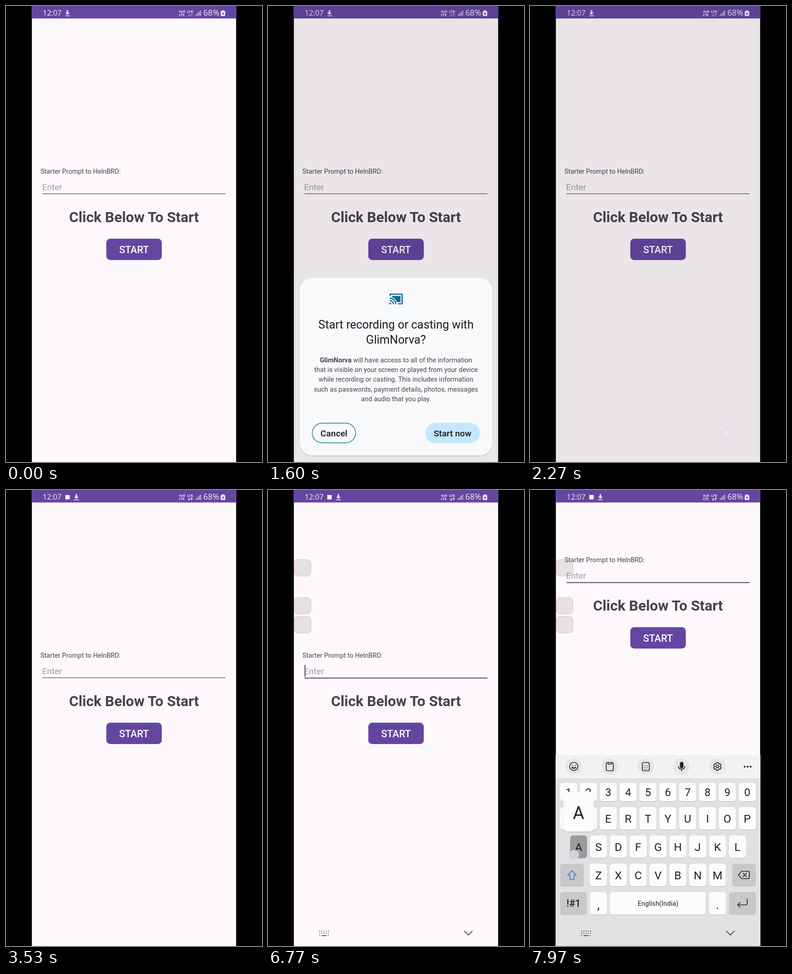
Animation, 561 px wide and 998 px high, one loop 8000 ms. Source, as an HTML page:

```html
<!DOCTYPE html>
<html lang="en">
<head>
<meta charset="utf-8">
<title>Start screen</title>
<style>
  html, body { margin: 0; width: 100%; height: 100%; overflow: hidden; background: #000; }
  svg { display: block; width: 100%; height: 100%; font-family: Roboto, sans-serif; }
  .mid { text-anchor: middle; }
  .medium { font-weight: 500; }
  .status { font-family: "Open Sans", sans-serif; }
  .line { fill: none; stroke-linecap: round; stroke-linejoin: round; }

  .anim { animation: 8s linear infinite; }
  #dim { animation-name: dim; }
  #sheet { animation-name: sheet; }
  #form { animation-name: form; }
  #ripple { animation-name: ripple; }
  #thin { animation-name: thin; }
  #thick { animation-name: thick; }
  #caret { animation-name: caret; }
  #notice { animation-name: notice; }
  #download { animation-name: download; }
  #traffic { animation-name: traffic; }
  #bubbles { animation-name: bubbles; }
  #nav { animation-name: nav; }
  #keyboard { animation-name: keyboard; }
  .lower { animation-name: lower; }
  .upper { animation-name: upper; }
  #shift { animation-name: shift; }
  #shiftPress { animation-name: shiftPress; }
  #pressA { animation-name: pressA; }
  #dot { animation-name: dot; }
  #spot { animation-name: spot; animation-timing-function: step-end; }

  @keyframes dim { 0%, 17.5% { opacity: 0 } 19.6%, 28.8% { opacity: 1 } 32%, 100% { opacity: 0 } }
  @keyframes sheet {
    0%, 17.5% { transform: translateY(420px); animation-timing-function: cubic-bezier(.1, .7, .3, 1) }
    19.8%, 26.6% { transform: none; animation-timing-function: ease-in }
    28.1%, 100% { transform: translateY(420px) }
  }
  @keyframes form { 0%, 86.9% { transform: none } 86.91%, 100% { transform: translateY(-209px) } }
  @keyframes ripple {
    0%, 7.1% { opacity: 0 } 8%, 9% { opacity: .2 } 13%, 65.2% { opacity: 0 }
    66%, 67% { opacity: .2 } 71%, 100% { opacity: 0 }
  }
  @keyframes thin { 0%, 81.4% { opacity: 1 } 81.5%, 100% { opacity: 0 } }
  @keyframes thick { 0%, 81.4% { opacity: 0 } 81.5%, 100% { opacity: 1 } }
  @keyframes caret { 0%, 82% { opacity: 0 } 82.01%, 95% { opacity: 1 } 95.01%, 100% { opacity: 0 } }
  @keyframes notice { 0%, 38.7% { opacity: 0 } 39.5%, 100% { opacity: 1 } }
  @keyframes download { 0%, 38.4% { transform: translateX(-19.5px) } 40.5%, 100% { transform: none } }
  @keyframes traffic { 0%, 43.4% { opacity: .5 } 43.5%, 100% { opacity: 1 } }
  @keyframes bubbles { 0%, 68.8% { opacity: 0 } 71.5%, 100% { opacity: 1 } }
  @keyframes nav { 0%, 82.5% { opacity: 0 } 84.4%, 100% { opacity: 1 } }
  @keyframes keyboard {
    0%, 86.6% { transform: translateY(418px); animation-timing-function: cubic-bezier(.2, .6, .3, 1) }
    89.6%, 100% { transform: none }
  }
  @keyframes lower { 0%, 95.2% { opacity: 1 } 95.21%, 100% { opacity: 0 } }
  @keyframes upper { 0%, 95.2% { opacity: 0 } 95.21%, 100% { opacity: 1 } }
  @keyframes shift { 0%, 95.2% { stroke: #222 } 95.21%, 100% { stroke: #3b6fd0 } }
  @keyframes shiftPress { 0%, 94.1% { opacity: 0 } 94.12%, 95.2% { opacity: .25 } 95.8%, 100% { opacity: 0 } }
  @keyframes pressA { 0%, 98.6% { opacity: 0 } 98.61%, 100% { opacity: 1 } }
  @keyframes dot {
    0%, 7.1% { opacity: 0 } 7.2%, 8.5% { opacity: 1 } 9.2%, 25.4% { opacity: 0 }
    25.5%, 27.6% { opacity: 1 } 28.4% { opacity: .65 } 28.9%, 65.1% { opacity: 0 }
    65.4%, 66.4% { opacity: 1 } 67.2%, 80.9% { opacity: 0 }
    81%, 82.1% { opacity: 1 } 83%, 94.1% { opacity: 0 }
    94.2%, 95.2% { opacity: 1 } 95.8%, 98.5% { opacity: 0 } 98.6%, 100% { opacity: 1 }
  }
  @keyframes spot {
    0% { transform: translate(290px, 536px) }
    20% { transform: translate(430px, 935px) }
    50% { transform: translate(290px, 536px) }
    75% { transform: translate(240px, 397px) }
    88% { transform: translate(92px, 846px) }
    97%, 100% { transform: translate(97px, 798px) }
  }
</style>
</head>
<body>
<svg viewBox="0 0 561 998">
  <defs>
    <clipPath id="phone"><rect x="56.7" width="447.6" height="998"/></clipPath>
    <filter id="soft" x="-20%" y="-20%" width="140%" height="140%">
      <feDropShadow dx="0" dy="1" stdDeviation="1" flood-opacity=".25"/>
    </filter>
  </defs>
  <rect width="561" height="998"/>
  <g clip-path="url(#phone)">
    <rect x="56" width="449" height="998" fill="#fdf8fc"/>

    <g id="form" class="anim" fill="#46434d">
      <text x="75.4" y="367" font-size="14.5">Starter Prompt to HelnBRD:</text>
      <text x="79" y="403" font-size="19" fill="#a19ca6">Enter</text>
      <rect id="thin" class="anim" x="80" y="410.2" width="401" height="1.3" fill="#55525c"/>
      <rect id="thick" class="anim" x="80" y="410.5" width="401" height="2.2" fill="#5d5773"/>
      <rect id="caret" class="anim" x="80" y="383" width="2.2" height="26" fill="#5d4c92"/>
      <text class="mid" x="280.5" y="473" font-size="31.6" font-weight="700">Click Below To Start</text>
      <rect x="219.8" y="509.3" width="121.6" height="46.8" rx="8.5" fill="#6446a0"/>
      <rect id="ripple" class="anim" x="219.8" y="509.3" width="121.6" height="46.8" rx="8.5" fill="#fff"/>
      <text class="mid medium" x="280.6" y="541" font-size="21.5" fill="#fff">START</text>
    </g>

    <g id="bubbles" class="anim" fill="#000" fill-opacity=".09" stroke="#f2bcbc" stroke-width="1.2">
      <rect x="57.5" y="152" width="36.5" height="36.5" rx="9"/>
      <rect x="57.5" y="235" width="36.5" height="36.5" rx="9"/>
      <rect x="57.5" y="276.5" width="36.5" height="36.5" rx="9"/>
    </g>

    <g fill="#f1ebfa">
      <rect x="56" width="449" height="27.3" fill="#6446a0"/>
      <text class="status" x="80.5" y="21.2" font-size="16.2">12:07</text>
      <rect id="notice" class="anim" x="130" y="11" width="9.5" height="9.5" fill="#fff"/>
      <path id="download" class="anim" d="M152.7 9h3v5.5h3.3l-4.8 5-4.8-5h3.3zM149 20.7h10.6v1.6H149z"/>
      <g font-weight="700" font-size="8">
        <text x="379" y="15" font-size="7.5">Vo</text>
        <text x="379" y="22" font-size="7.5">LTE</text>
        <text x="397" y="15">LTE</text>
      </g>
      <path class="line" stroke="#f1ebfa" d="M389 9.5q1.7 2.5 0 5M391 9q2 3 0 6"/>
      <path id="traffic" class="anim line" stroke="#f1ebfa" stroke-width="1.2"
        d="M401.5 17v5.5m-2-2 2 2 2-2M407 22.5v-5.5m-2 2 2-2 2 2"/>
      <path d="M416 18h1.7v3.5h-1.7zM419.2 15.5h1.7v6h-1.7zM422.4 12.5h1.7v9h-1.7zM425.6 10h1.7v11.5h-1.7z" opacity=".85"/>
      <text class="status" x="432.4" y="21.3" font-size="17.8">68%</text>
      <path d="M473.5 9.5h4v1.5h1q2 0 2 2v7q0 2-2 2h-6q-2 0-2-2v-7q0-2 2-2h1z"/>
      <path fill="#6446a0" d="M477 12.5l-4 5h2.3l-1 3.5 4.2-5h-2.3z"/>
    </g>

    <rect id="dim" class="anim" x="56" width="449" height="998" fill-opacity=".08"/>

    <g id="sheet" class="anim">
      <rect x="69" y="594.5" width="423" height="389.5" rx="29" fill="#f7f9fb" filter="url(#soft)"/>
      <g fill="none" stroke="#126c90" stroke-width="2.6">
        <path d="M267.5 634v-3.2h26.5v20.9h-9"/>
        <path d="M267 639.5a13 13 0 0 1 13 13.3M267 644.7a8 8 0 0 1 8 8.1"/>
      </g>
      <path fill="#126c90" d="M266.2 649a4 4 0 0 1 4 4h-4zM272 634.5h18.5v13.5h-8.2q-2.5-8-10.3-10.8z"/>
      <g class="mid" fill="#191c1f" font-size="25.4">
        <text x="280.5" y="706">Start recording or casting with</text>
        <text x="280.5" y="739">GlimNorva?</text>
      </g>
      <g class="mid" fill="#43464b" font-size="14.6">
        <text x="280.5" y="780"><tspan font-weight="700">GlimNorva</tspan> will have access to all of the information</text>
        <text x="280.5" y="801.2">that is visible on your screen or played from your device</text>
        <text x="280.5" y="822.4">while recording or casting. This includes information</text>
        <text x="280.5" y="843.6">such as passwords, payment details, photos, messages</text>
        <text x="280.5" y="864.8">and audio that you play.</text>
      </g>
      <rect x="97" y="913" width="95" height="43" rx="21.5" fill="none" stroke="#1b7391" stroke-width="1.4"/>
      <rect x="345" y="912.5" width="119.5" height="44" rx="22" fill="#c3e8fd"/>
      <g class="mid medium" fill="#15191c" font-size="19.2">
        <text x="144.5" y="942">Cancel</text>
        <text x="404.5" y="942">Start now</text>
      </g>
    </g>

    <g id="keyboard" class="anim">
      <rect x="56" y="580" width="449" height="418" fill="#e1e1e3"/>
      <rect x="56" y="580" width="449" height="51" fill="#f2f2f3"/>
      <g id="tools" fill="#e6e6e8"></g>
      <g class="line" stroke="#222" stroke-width="1.7">
        <circle cx="96" cy="605" r="9"/>
        <path d="M91.5 607q4.5 6 9 0zM92.8 602v.6M99.2 602v.6"/>
        <rect x="167" y="596.5" width="15.5" height="18" rx="3"/>
        <path d="M171 597v3h7.5v-3"/>
        <rect x="246" y="596.5" width="15.5" height="18" rx="3"/>
        <path stroke-dasharray=".1 3.5" d="M250 603h9M250 607h9M252 611h5"/>
        <path d="M325.5 605q0 6 6.8 6t6.8-6M332.3 611v4"/>
        <path d="M408.6 596.5h4l1 3 3-.6 2.2 3.5-2.2 2.6 2.2 2.7-2.2 3.5-3-.6-1 3h-4l-1-3-3 .6-2.2-3.5 2.2-2.7-2.2-2.6 2.2-3.5 3 .6z"/>
        <circle cx="410.6" cy="605" r="3"/>
        <path stroke-width="4.2" d="M470.5 605.5h.01M477 605.5h.01M483.5 605.5h.01"/>
      </g>
      <rect x="328.6" y="595" width="7.6" height="14" rx="3.8" fill="#222"/>
      <g id="keys" class="mid" fill="#202022"></g>
      <rect id="shiftPress" class="anim" x="66" y="818" width="52" height="49.5" rx="6"/>
      <g class="line" stroke="#222" stroke-width="1.7">
        <path id="shift" class="anim" d="M92 833l-9.5 10h5v9.5h9v-9.5h5z"/>
        <path d="M464 834.5h14.5q2 0 2 2v12q0 2-2 2h-14.5l-7.5-8zM467 839l7 7M474 839l-7 7"/>
        <path d="M476 895v9q0 4-4 4h-17m5.5-5.5-5.5 5.5 5.5 5.5"/>
      </g>
      <g id="pressA" class="anim mid" fill="#202022">
        <rect x="88" y="756" width="37" height="49.5" rx="6" fill="#9c9c9e"/>
        <text x="106.5" y="790" font-size="24.5">A</text>
        <rect x="73" y="661" width="67" height="86.5" rx="9" fill="#fcfcfd" filter="url(#soft)"/>
        <text x="106.5" y="720" font-size="38">A</text>
      </g>
    </g>

    <g id="nav" class="anim line" stroke="#55545a" stroke-width="1.7">
      <path stroke-width="2.2" stroke-dasharray=".1 4.7" d="M113.2 965.5h20M113.2 970h20M113.2 975h3M132 975h.5"/>
      <path stroke-width="2" d="M118.5 975.3h9M430.5 965.5l8.5 8.5 8.5-8.5"/>
    </g>

    <g id="spot" class="anim">
      <circle id="dot" class="anim" r="10" fill="#e9edf5" fill-opacity=".7" stroke="#b9cdee" stroke-width="1.2"/>
    </g>
  </g>
</svg>
<script>
  const byId = id => document.getElementById(id);
  const PITCH = 43.5, KEY_W = 37, GREY = '#c8c8cb';

  const cap = (x, y, w, h, fill = '#fcfcfd') =>
    `<rect x="${x}" y="${y + 1.5}" width="${w}" height="${h}" rx="6" fill="#c9c9cd"/>` +
    `<rect x="${x}" y="${y}" width="${w}" height="${h}" rx="6" fill="${fill}"/>`;
  const label = (x, y, size, text, cls = '') =>
    `<text class="${cls}" x="${x}" y="${y}" font-size="${size}">${text}</text>`;

  // One row of equal keys; letters carry both cases.
  const row = (chars, x0, y, h, size) => [...chars].map((ch, i) => {
    const x = x0 + i * PITCH, mid = x + KEY_W / 2, base = y + h / 2 + size * .37;
    const glyph = /[A-Z]/.test(ch)
      ? label(mid, base, size, ch, 'anim upper') + label(mid, base, size, ch.toLowerCase(), 'anim lower')
      : label(mid, base, size, ch);
    return cap(x, y, KEY_W, h) + glyph;
  }).join('');

  byId('keys').innerHTML =
    row('1234567890', 66, 641, 40, 23.5) +
    row('QWERTYUIOP', 66, 694, 49, 24.5) +
    row('ASDFGHJKL', 88, 756, 49, 24.5) +
    row('ZXCVBNM', 131.5, 818, 49, 24.5) +
    cap(66, 818, 52, 49, GREY) + cap(443, 818, 52, 49, GREY) +
    cap(66, 880, 58.5, 49, GREY) + label(95.5, 912, 21.5, '!#1', 'medium') +
    cap(131.5, 880, KEY_W, 49) + label(150, 917, 28, ',') +
    cap(175, 880, 210.5, 49) + label(280.5, 910, 14.6, 'English(India)') +
    cap(392.5, 880, KEY_W, 49) + label(411, 917, 28, '.') +
    cap(436, 880, 59, 49, GREY);

  byId('tools').innerHTML = [0, 1, 2, 3, 4]
    .map(i => `<circle cx="${96 + i * 78.7}" cy="605" r="18"/>`).join('');
</script>
</body>
</html>
```
